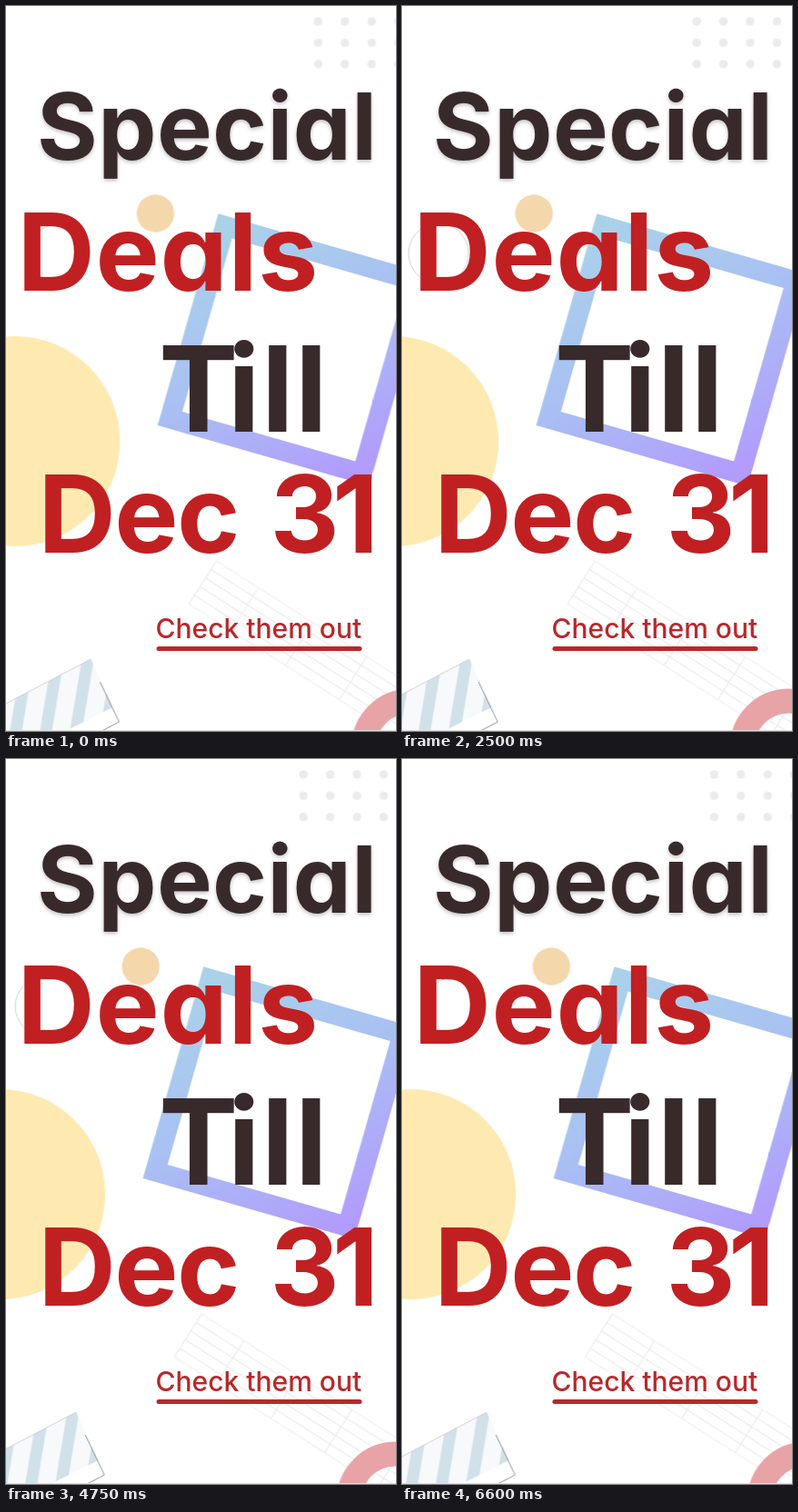
Animation, 429 px wide and 797 px high, one loop 6650 ms. Source, as an HTML page:

```html
<!DOCTYPE html>
<html lang="en">
<head>
<meta charset="utf-8">
<title>Special Deals</title>
<style>
  html, body { margin: 0; width: 100%; height: 100%; overflow: hidden; background: #fff; }
  svg { display: block; width: 100vw; height: 100vh; }
  text {
    font-family: Inter, "Open Sans", sans-serif;
    font-weight: 700;
    font-optical-sizing: none;
    font-feature-settings: "cv11";
  }
  .dark { fill: #382a2b; }
  .red { fill: #c12022; }
  .special { font-size: 102px; letter-spacing: .4px; filter: drop-shadow(0 2px 2px rgba(0, 0, 0, .25)); }
  .deals { font-size: 118px; letter-spacing: .7px; }
  .till { font-size: 131px; letter-spacing: 1.5px; }
  .date { font-size: 118px; letter-spacing: -1.5px; word-spacing: 8px; }
  .link { font-size: 30px; font-weight: 500; fill: #b9282b; }

  /* Quick slide, then a slow settle, every 1.5 s */
  #drift { animation: drift 6650ms linear infinite; }
  @keyframes drift {
    0% { transform: translateX(-.6px); }
    8.271% { transform: none; }
    20.301% { transform: none; animation-timing-function: cubic-bezier(.25, .1, .1, 1); }
    32.331% { transform: translateX(-19.5px); }
    41.353% { transform: translateX(-20px); }
    42.857% { transform: translateX(-20px); animation-timing-function: cubic-bezier(.25, .1, .1, 1); }
    54.887% { transform: translateX(-.6px); }
    63.91% { transform: none; }
    65.414% { transform: none; animation-timing-function: cubic-bezier(.25, .1, .1, 1); }
    77.444% { transform: translateX(-19.5px); }
    86.466% { transform: translateX(-20px); }
    87.97% { transform: translateX(-20px); animation-timing-function: cubic-bezier(.25, .1, .1, 1); }
    100% { transform: translateX(-.6px); }
  }
</style>
</head>
<body>
<svg viewBox="0 0 429 797" preserveAspectRatio="none">
  <defs>
    <linearGradient id="sky" x1="0" y1="0" x2="1" y2="1">
      <stop offset="0" stop-color="#a9d2e9"/>
      <stop offset=".45" stop-color="#a9c1f3"/>
      <stop offset="1" stop-color="#b29bfd"/>
    </linearGradient>
    <pattern id="dots" x="329.3" y="5.3" width="29.4" height="23.4" patternUnits="userSpaceOnUse">
      <circle cx="14.7" cy="11.7" r="4.7" fill="#ebebeb"/>
    </pattern>
    <clipPath id="ribbon"><path d="M94 718L118 771L60 800H-40V788Z"/></clipPath>
  </defs>

  <g id="drift">
    <rect x="329.3" y="5.3" width="117.6" height="70.2" fill="url(#dots)"/>
    <circle cx="60" cy="272" r="33" fill="none" stroke="#cbd0d3"/>
    <circle cx="10.5" cy="478.5" r="115.5" fill="#feeab1"/>
    <rect x="-110" y="-110" width="220" height="220" fill="none" stroke="url(#sky)" stroke-width="22"
          transform="translate(317 378) rotate(16)"/>
    <circle cx="165" cy="228" r="20.7" fill="#f4d8ac"/>

    <path transform="translate(232 610) rotate(32.5)" fill="none" stroke="#ebebeb" stroke-width="1.2"
          d="M0 0H330M0 11.2H330M0 22.4H330M0 33.6H330M0 44.8H330M0 56H330
             M0 0V56M55 0V56M126 0V56M196 0V56M266 0V56"/>

    <g clip-path="url(#ribbon)">
      <rect x="-40" y="710" width="170" height="90" fill="#f7f9fa"/>
      <path d="M125 710L110 800M92 710L77 800M59 710L44 800M26 710L11 800M-7 710L-22 800"
            stroke="#d0e1ea" stroke-width="13"/>
    </g>
    <path d="M94 718L-40 788" stroke="#c4c9cc" stroke-width=".8"/>
    <path d="M104 743L125 787L104 798" fill="none" stroke="#8f9598"/>
    <circle cx="445" cy="815" r="51" fill="none" stroke="#e8a3a6" stroke-width="27"/>
  </g>

  <text class="dark special" x="34" y="168.5">Special</text>
  <text class="red deals" x="12.5" y="312.5">Deals</text>
  <text class="dark till" x="168" y="468" dx="0 -13">Till</text>
  <text class="red date" x="35.5" y="600.5" dx="0 0 0 0 0 -6">Dec 31</text>
  <text class="link" x="164.5" y="695">Check them out</text>
  <path d="M168 706.5H389" stroke="#b9282b" stroke-width="5" stroke-linecap="round"/>
  <path d="M0 796.5H429" stroke="#dedede"/>
</svg>
</body>
</html>
```
